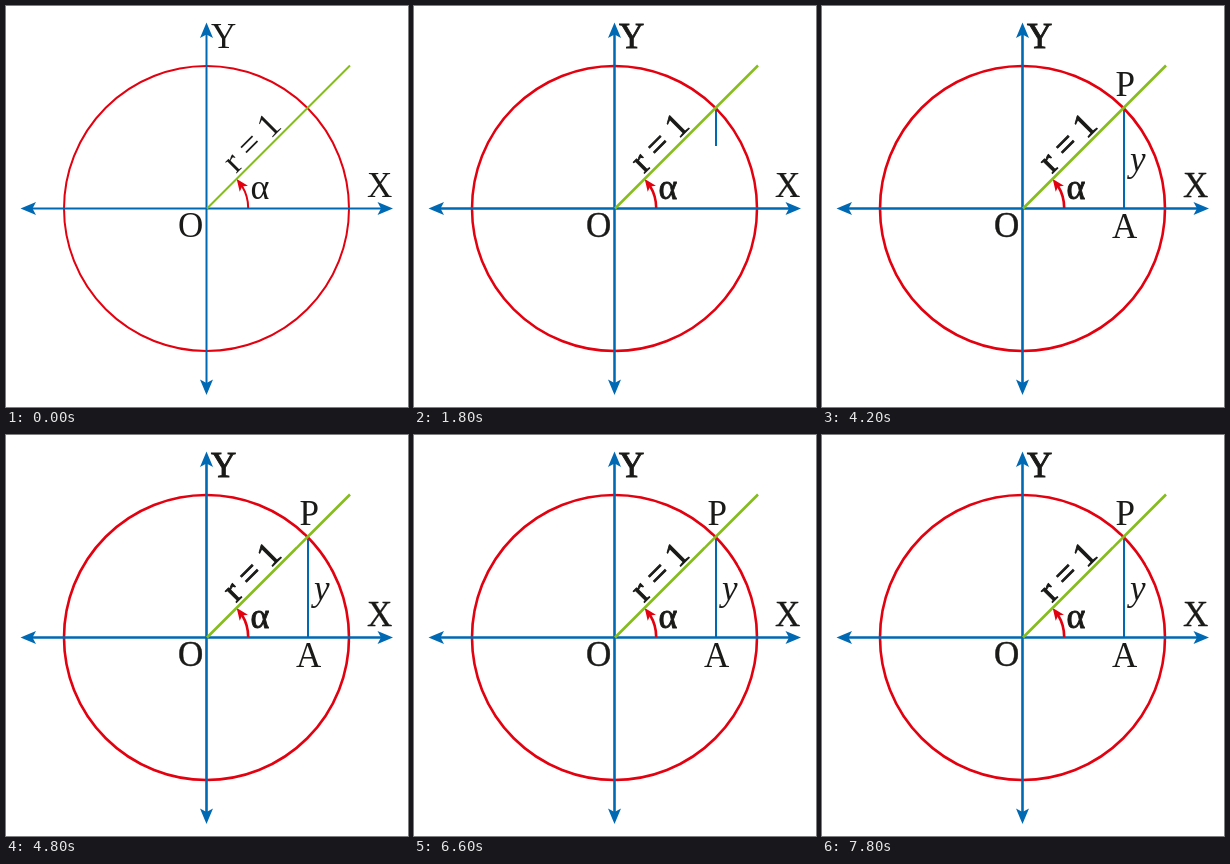
Animation, 402 px wide and 401 px high, one loop 8000 ms. Source, as an HTML page:

```html
<!DOCTYPE html>
<html lang="en">
<head>
<meta charset="utf-8">
<title>Unit circle</title>
<style>
  html, body { margin: 0; width: 100%; height: 100%; overflow: hidden; background: #fff; }
  svg { display: block; width: 100%; height: 100%; }
  text { font: 35px "Liberation Serif", "Times New Roman", serif; fill: #1a1a18; stroke: #1a1a18; stroke-width: 0; }
  .line { fill: none; stroke-width: 2; }
  .blue { stroke: #0069b4; }
  .red { stroke: #e3000f; }
  .green { stroke: #84bd1c; }
</style>
</head>
<body>
<svg viewBox="0 0 402 401">
  <defs>
    <path id="head" d="M0 0L-15.5 6.5L-12 0L-15.5 -6.5Z"/>
  </defs>
  <path id="drop" class="line blue" d="M302 102V202"/>
  <circle class="line red grow" cx="200.5" cy="202.5" r="142.5"/>
  <path class="line blue grow" d="M25 202.5H377M200.5 27V379"/>
  <g fill="#0069b4">
    <use href="#head" transform="translate(387 202.5)"/>
    <use href="#head" transform="translate(14.5 202.5) rotate(180)"/>
    <use href="#head" transform="translate(200.5 16.5) rotate(-90)"/>
    <use href="#head" transform="translate(200.5 389) rotate(90)"/>
  </g>
  <path class="line red grow" d="M242.2 202A42 42 0 0 0 236 180"/>
  <use href="#head" fill="#e3000f" transform="translate(230.7 173) rotate(-126) scale(.78)"/>
  <path class="line green grow" d="M201 202.5L344 59.5"/>
  <text x="205" y="42" data-bold="1">Y</text>
  <text x="361" y="191" data-bold=".3">X</text>
  <text x="172" y="231" data-bold=".5">O</text>
  <text x="244.5" y="192.5" data-bold="1" style="font-size:36px">α</text>
  <text transform="translate(230 168) rotate(-45)" data-bold="1">r = 1</text>
  <text x="293.5" y="90" data-from="3000">P</text>
  <text x="290" y="232" data-from="3600">A</text>
  <text x="308" y="164.8" data-from="4200" font-style="italic" style="font-style:italic">y</text>
</svg>
<script>
const LOOP = 8000;
const all = s => [...document.querySelectorAll(s)];
const lines = all('.grow'), bolds = all('[data-bold]'), labels = all('[data-from]');
const drop = document.getElementById('drop');

// Lines and letters gain weight in steps.
const weightAt = t => t < 600 ? 0 : t < 1800 ? 0.6 : t < 2400 ? 0.85 : 1;

function draw(t) {
  const w = weightAt(t);
  for (const el of lines) el.style.strokeWidth = 2 + 0.6 * w;
  for (const el of bolds) el.style.strokeWidth = 0.9 * w * el.dataset.bold;
  for (const el of labels) el.style.display = t >= +el.dataset.from ? '' : 'none';
  drop.style.display = t >= 1800 ? '' : 'none';
  drop.setAttribute('d', `M302 102V${t < 2400 ? 140 : 202}`);
}

const start = performance.now();
function tick() {
  draw((performance.now() - start) % LOOP);
  requestAnimationFrame(tick);
}
tick();
</script>
</body>
</html>
```
